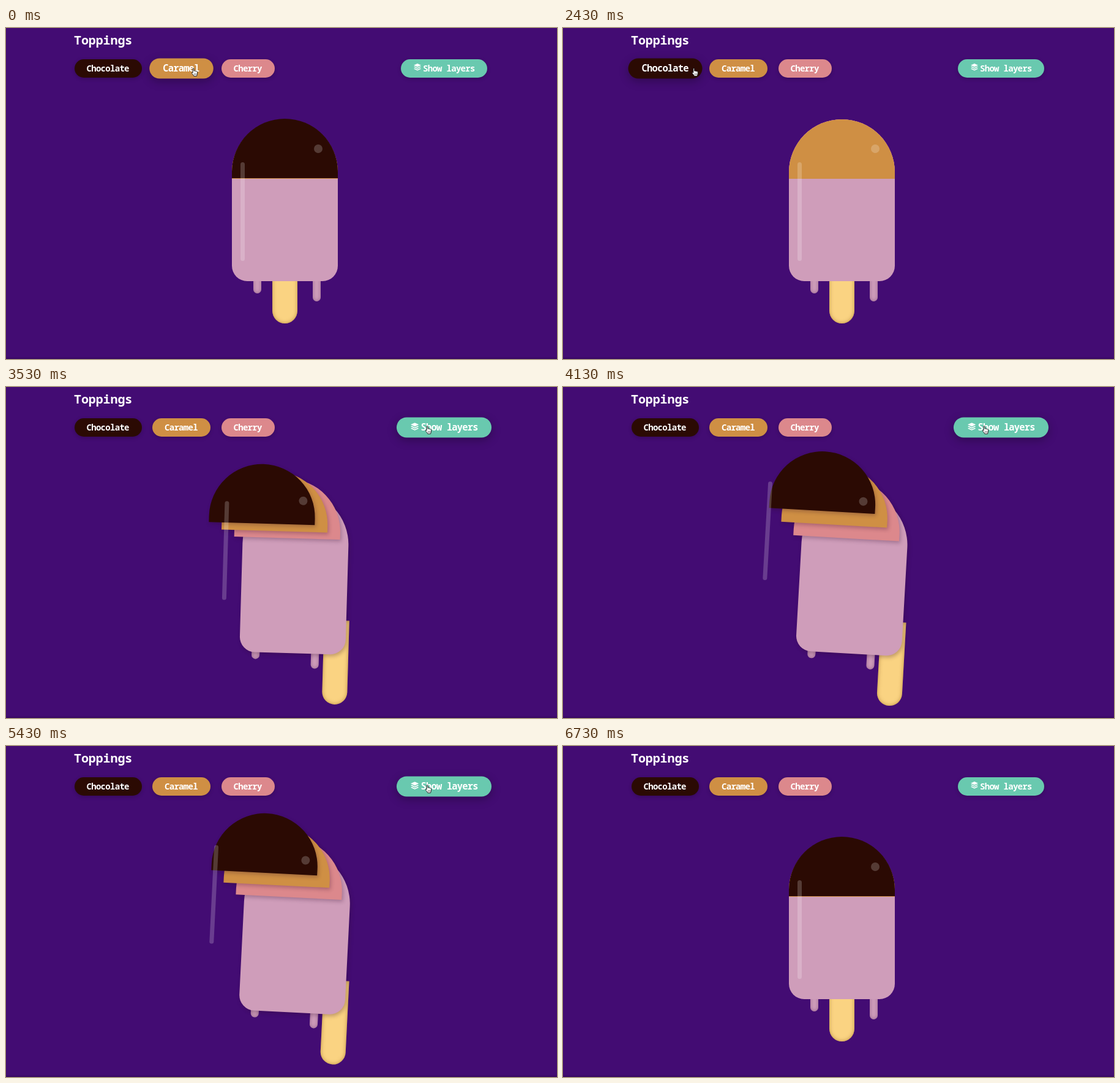
Animation of 900x540 px, one loop 6760 ms. Source, as an HTML page:

```html
<!DOCTYPE html>
<html lang="en">
<head>
<meta charset="utf-8">
<title>Toppings</title>
<style>
  html, body { margin: 0; width: 100%; height: 100%; overflow: hidden; background: #430c73; }
  #stage { position: relative; width: 900px; height: 540px; overflow: hidden;
    background: #430c73; box-shadow: inset 0 -2px 2px #37095f;
    font-family: "Noto Sans Mono", "DejaVu Sans Mono", monospace; font-weight: 600; color: #fff; }
  #stage * { position: absolute; box-sizing: border-box; }
  h1 { margin: 0; left: 111px; top: 6px; font-size: 20px; line-height: 28px; font-weight: 600; letter-spacing: -.1px; }
  .btn { top: 50.7px; height: 30.3px; border-radius: 16px; }
  .btn span { left: 20px; top: 0; font-size: 14px; line-height: 29px; letter-spacing: -.7px; white-space: pre; }
  #show span { left: 36px; }
  #show svg { left: 20.5px; top: 7.5px; }
  #pop { inset: 0; transform-origin: 455.5px 372px; }
  #stick { left: 435px; top: 345px; width: 41px; height: 137px; background: #fad382;
    border-radius: 0 0 20.5px 20.5px; box-shadow: inset 0 0 6px rgba(125, 75, 0, .5); }
  .drip { width: 13.5px; background: #cf9dba; border-radius: 7px; box-shadow: inset 0 0 6px rgba(70, 20, 80, .4); }
  #dripA { left: 403.7px; top: 390px; height: 43.3px; }
  #dripB { left: 500.7px; top: 390px; height: 55.8px; }
  #body { left: 369px; top: 149px; width: 173px; height: 263.5px; background: #cf9dba;
    border-radius: 86.5px 86.5px 25px 25px; }
  .top { left: 369px; top: 149px; width: 173px; height: 97px; border-radius: 86.5px 86.5px 0 0; }
  #cherry { background: #dc888c; }
  #caramel { background: #cf8f44; }
  #choc { background: #2b0a03; top: 148.3px; }
  #dot { left: 502.5px; top: 189.5px; width: 14px; height: 14px; border-radius: 50%; background: rgba(255, 255, 255, .2); }
  #bar { left: 383px; top: 219px; width: 7px; height: 160.5px; border-radius: 3.5px; background: rgba(255, 255, 255, .2); }
  #hand { left: 0; top: 0; }
</style>
</head>
<body>
<div id="stage">
  <h1>Toppings</h1>
  <div class="btn" id="bChoc" style="left:111.5px;width:110px;background:#2b0a03"><span>Chocolate</span></div>
  <div class="btn" id="bCaramel" style="left:239px;width:95px;background:#cf8f44"><span>Caramel</span></div>
  <div class="btn" id="bCherry" style="left:351.5px;width:87.5px;background:#dc888c"><span>Cherry</span></div>
  <div class="btn" id="show" style="left:645px;width:141px;background:#69c9af">
    <svg width="12" height="12" viewBox="0 0 12 12" fill="#fff">
      <path d="M6 0L12 2.8 6 5.6 0 2.8ZM0 5.6L1.6 4.8 6 6.9 10.4 4.8 12 5.6 6 8.5ZM0 8.5L1.6 7.7 6 9.8 10.4 7.7 12 8.5 6 11.4Z"/>
    </svg>
    <span>Show layers</span>
  </div>
  <div id="pop">
    <div id="stick"></div>
    <div class="drip" id="dripA"></div>
    <div class="drip" id="dripB"></div>
    <div id="body"></div>
    <div class="top" id="cherry"></div>
    <div class="top" id="caramel"></div>
    <div class="top" id="choc"></div>
    <div id="dot"></div>
    <div id="bar"></div>
  </div>
  <svg id="hand" width="12" height="15" viewBox="0 0 12 15">
    <path d="M2.6 1.6C2.6 .3 4.4 .3 4.5 1.6V5.2C5 4.5 6.2 4.6 6.4 5.5 7 4.9 8.1 5.1 8.3 6 9.2 5.6 10.1 6.1 10.1 7.1V10C10 11.5 9 12 9 13.4H4.2C4 11.8 1.5 10 .8 8.4 .5 7.4 1.6 7 2.6 8.2Z"
      fill="#fff" stroke="#111" stroke-width=".9" stroke-linejoin="round"/>
    <path d="M5 9.2V11.6M6.7 9.2V11.6M8.3 9.2V11.6" stroke="#111" stroke-width=".6"/>
  </svg>
</div>
<script>
const LOOP = 6760;
const $ = id => document.getElementById(id);
const clamp = v => Math.max(0, Math.min(1, v));
const smooth = v => v * v * (3 - 2 * v);

// cubic-bezier(.25, .1, .25, 1)
function ease(x) {
  x = clamp(x);
  let lo = 0, hi = 1;
  for (let i = 0; i < 20; i++) {
    const m = (lo + hi) / 2, n = 1 - m;
    if (.75 * n * m + m * m * m < x) lo = m; else hi = m;
  }
  const u = lo, w = 1 - u;
  return x === 1 ? 1 : .3 * w * w * u + 3 * w * u * u + u * u * u;
}

// Value of a transition retargeted at each [time, goal] step
function track(steps, dur, start, t) {
  let v = start;
  for (let i = 0; i < steps.length && t >= steps[i][0]; i++) {
    const end = i + 1 < steps.length ? Math.min(t, steps[i + 1][0]) : t;
    v += (steps[i][1] - v) * ease((end - steps[i][0]) / dur);
  }
  return v;
}

const toggles = [[3290, 1], [4300, 0], [4950, 1], [5800, 0]];
const hovers = {
  bChoc: [[2170, 1], [2860, 0]],
  bCaramel: [[-500, 1], [830, 0], [1790, 1], [2200, 0]],
  bCherry: [[870, 1], [1740, 0]],
  show: [[2960, 1], [6180, 0]]
};
const toppings = {
  choc: [[380, 0], [2640, 1]],
  caramel: [[1420, 0], [1990, 1]]
};
// Per part: shift when spread, then shift per unit of tilt
const parts = {
  stick: [85, 33.5, 0, 0],
  dripA: [-1, 12, 0, 0],
  dripB: [-1, 12, 0, 0],
  body: [14, 21, 0, 0],
  cherry: [0, .5, 0, 0],
  caramel: [-21, 0, 0, -6],
  choc: [-42, 0, 0, -12],
  dot: [-30, -12, 0, 0],
  bar: [0, 0, -17.6, -17]
};
const path = [
  [0, 307, 72], [900, 304, 72], [1130, 304, 72], [1400, 394, 71], [1660, 394, 71],
  [1920, 288, 72], [2249, 290, 72], [2569, 165, 72], [2780, 165, 72],
  [3170, 689, 70], [5960, 689, 70], [6290, 842, -16]
];

function cursor(t) {
  let i = 0;
  while (i < path.length - 2 && t >= path[i + 1][0]) i++;
  const [t0, x0, y0] = path[i], [t1, x1, y1] = path[i + 1];
  const k = smooth(clamp((t - t0) / (t1 - t0)));
  return [x0 + (x1 - x0) * k, y0 + (y1 - y0) * k];
}

function draw(t) {
  const spread = track(toggles, 220, 0, t);
  const tilt = 3.4 * track(toggles, 800, 0, t);
  $('pop').style.transform = `rotate(${tilt * .95}deg)`;
  for (const id in parts) {
    const [fx, fy, sx, sy] = parts[id];
    $(id).style.transform = `translate(${fx * spread + sx * tilt}px, ${fy * spread + sy * tilt}px)`;
  }
  const shade = `2px 3px 6px rgba(45, 10, 40, ${.28 * clamp(tilt)})`;
  for (const id of ['body', 'cherry', 'caramel', 'choc']) $(id).style.boxShadow = shade;
  for (const id in toppings) $(id).style.opacity = track(toppings[id], 250, 1, t);

  for (const id in hovers) {
    const h = track(hovers[id], 250, 0, t), s = $(id).style;
    s.transform = `scale(${1 + .1 * h})`;
    s.boxShadow = `0 ${2 + 2 * h}px ${6 + 8 * h}px rgba(0, 0, 0, ${.2 + .08 * h})`;
  }
  const [x, y] = cursor(t);
  $('hand').style.transform = `translate(${x - 4.5}px, ${y - 7}px)`;
}

const begin = performance.now();
function tick() {
  draw((performance.now() - begin) % LOOP);
  requestAnimationFrame(tick);
}
draw(0);
requestAnimationFrame(tick);
</script>
</body>
</html>
```
